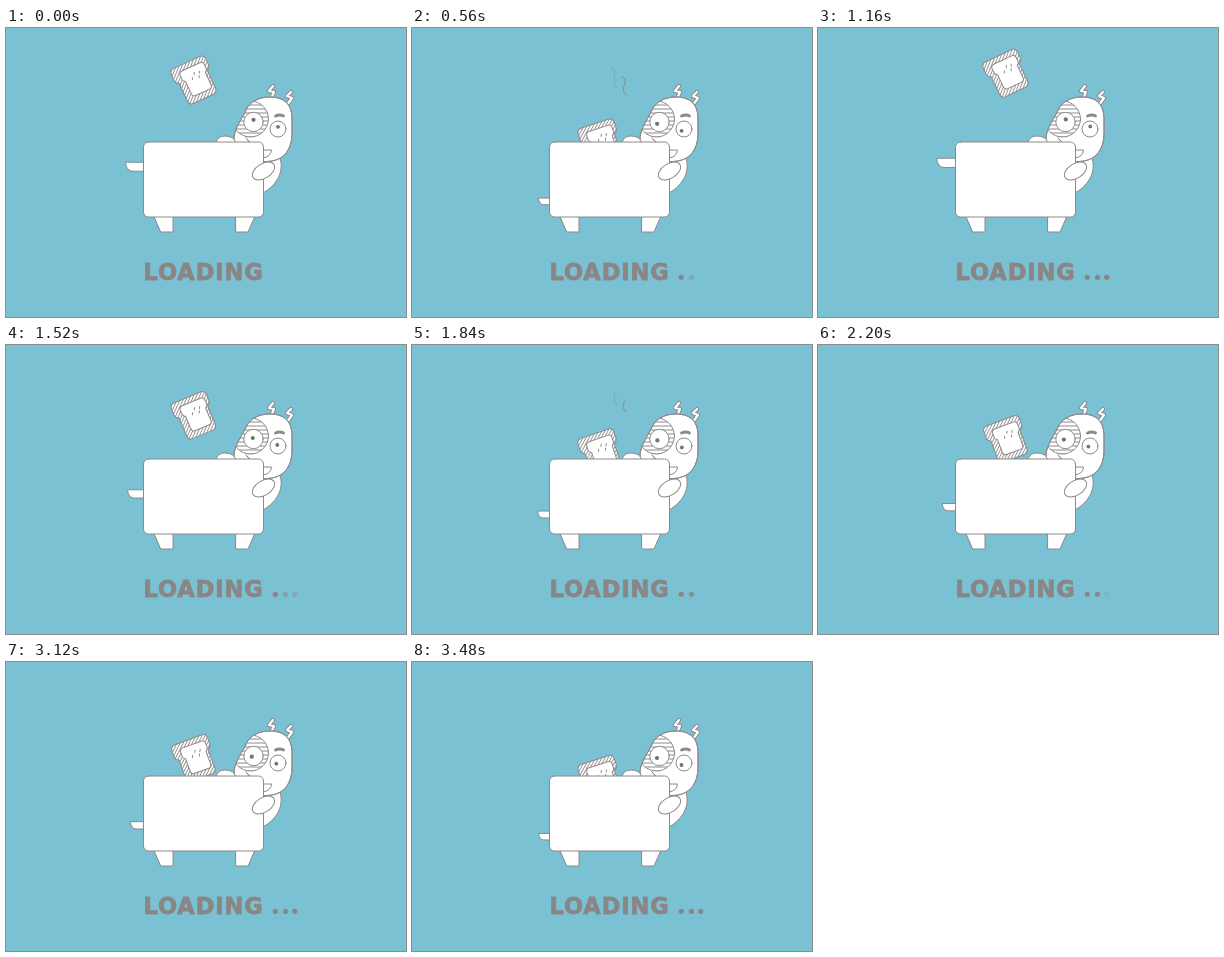
Write an HTML page that moves like this. It is 400 px wide and 289 px high and loops after 4 s.

```html
<!DOCTYPE html>
<html lang="en">
<head>
<meta charset="utf-8">
<title>Loading</title>
<style>
html, body { margin: 0; width: 100%; height: 100%; overflow: hidden; background: #7ac1d4; }
svg { display: block; width: 100vw; height: 100vh; }
.ink { fill: #fff; stroke: #8d898a; stroke-width: 1; stroke-linejoin: round; stroke-linecap: round; }
.line { fill: none; }
.label { font: 700 22.5px "DejaVu Sans", sans-serif; letter-spacing: .9px; fill: #8b8686; stroke: #8b8686; stroke-width: .8; }
</style>
</head>
<body>
<svg viewBox="0 0 400 289">
  <defs>
    <pattern id="crust" width="2.7" height="2.7" patternUnits="userSpaceOnUse" patternTransform="rotate(-43)">
      <rect width="3" height="3" fill="#fff"/>
      <path d="M0 1.3H3" stroke="#8d898a" stroke-width=".9"/>
    </pattern>
    <pattern id="patch" width="4" height="4" patternUnits="userSpaceOnUse">
      <path d="M0 1H4" stroke="#8d898a" stroke-width="1"/>
    </pattern>
    <path id="head" d="M228 112C227 101 237 90 241 80C246 72 255 69 264 69C280 69 286 78 286 91V106C286 120 279 131 266 133C246 136 229 128 228 112Z"/>
    <clipPath id="face"><use href="#head"/></clipPath>
    <path id="slice" d="M-14 -20H14Q19 -20 19 -15V-9Q19 -6 15.5 -4V15Q15.5 20 11 20H-11Q-15.5 20 -15.5 15V-4Q-19 -6 -19 -9V-15Q-19 -20 -14 -20Z"/>
    <path id="zigs" d="M267 58L263 63L268 64L265 71M285 64L281 68L286 70L281 77"/>
  </defs>
  <rect width="400" height="289" fill="#7ac1d4"/>

  <g id="steam" class="ink line">
    <path class="wisp" pathLength="1" opacity=".5" d="M200 40C207 48 198 52 205 60"/>
    <path class="wisp" pathLength="1" d="M211 49C218 55 206 59 214 67"/>
  </g>

  <g class="ink">
    <path d="M256 128H273C277 136 275 146 271 152Q266 160 257 165Z"/>
    <use href="#zigs" class="line" stroke-width="4.2"/>
    <use href="#zigs" class="line" stroke="#fff" stroke-width="2.2"/>
    <use href="#head"/>
    <circle cx="244.5" cy="91" r="18" fill="url(#patch)" clip-path="url(#face)"/>
    <use href="#head" class="line"/>
    <circle cx="247.5" cy="94" r="9.7"/>
    <circle cx="272" cy="101" r="8"/>
    <path class="line" d="M269.5 88Q274 86 277.5 88" stroke-width="2.8"/>
    <path d="M240 110Q250 121 257 122H265.5Q265 129 257 130Z"/>
  </g>
  <g id="eyes" fill="#77706f">
    <circle cx="248" cy="91" r="2.1"/>
    <circle cx="272.5" cy="98" r="1.9"/>
  </g>
  <path class="ink" d="M210 115Q211 108 219 108Q228 108 230 115Z"/>

  <g id="toast" class="ink">
    <use href="#slice" fill="url(#crust)"/>
    <use href="#slice" transform="translate(2 -.3) scale(.7)" stroke-width="1.4"/>
    <path class="line" d="M2 -6L3 -8M7 -5L8 -7M5 -1L6 -3M-2 -2L-1 -4"/>
  </g>

  <path id="lever" class="ink"/>
  <g class="ink">
    <path d="M148 188H167V204H155ZM230 188H249L242 204H230Z"/>
    <rect x="137.5" y="114" width="120" height="75" rx="5"/>
    <ellipse cx="257.5" cy="143" rx="12.3" ry="7.3" transform="rotate(-32 257.5 143)"/>
  </g>

  <text class="label" x="137.5" y="252">LOADING</text>
  <g id="dots" fill="#8b8686">
    <circle cx="269.3" cy="249.3" r="2.6"/>
    <circle cx="279.5" cy="249.3" r="2.6"/>
    <circle cx="288.7" cy="249.3" r="2.6"/>
  </g>
</svg>
<script>
const LOOP = 4000, STEP = 40, LAST = 3480;
const PERIOD = 1400, RISE = 640, PUFF = 340;
const $ = id => document.getElementById(id);
const dots = [...$("dots").children];
const wisps = [...document.querySelectorAll(".wisp")];

const clamp = x => Math.max(0, Math.min(1, x));
const easeOut = u => Math.sin(u * Math.PI / 2);

// 0 at the top of the jump, 1 down in the slot
const drop = phase => phase < RISE
  ? 1 - easeOut(phase / RISE)
  : easeOut((phase - RISE) / (PERIOD - RISE));

function leverPath(k) {
  const mid = 131.6 + 43.1 * k, h = 9.5 - 3 * k, w = 8 - 3 * k;
  const x = 118 + 8.6 * k, top = mid - h / 2, low = mid + h / 2;
  return `M138 ${top}H${x}Q${x + 1} ${low} ${x + w} ${low}H138Z`;
}

// A quick pass that fades away over a slow one
function dotOpacity(i, t) {
  const quick = clamp(t / 380 - i) * clamp((1720 - t) / 500);
  return Math.max(quick, clamp(t / 1000 - i));
}

// Each wisp is traced from its foot, then leaves the same way
function drawSteam(u) {
  const head = 1 - clamp(u / .5), tail = 1 - clamp((u - .7) / .3);
  $("steam").style.display = u > 0 && tail > head ? "" : "none";
  wisps.forEach(w => w.setAttribute("stroke-dasharray", `0 ${head} ${Math.max(0, tail - head)} 2`));
}

function draw(t) {
  const phase = (t - LAST + 3 * PERIOD) % PERIOD, k = drop(phase);
  $("toast").setAttribute("transform", `translate(189 ${40 + 77 * k}) rotate(${8 * k - 26})`);
  $("lever").setAttribute("d", leverPath(k));
  $("eyes").setAttribute("transform", `translate(${-3 * k} ${5 * k})`);
  dots.forEach((dot, i) => dot.setAttribute("opacity", dotOpacity(i, t)));
  drawSteam((phase - PERIOD + PUFF) / PUFF);
}

const start = performance.now();
function tick(now) {
  const t = Math.max(0, now - start) % LOOP;
  draw(Math.min(LAST, Math.floor(t / STEP) * STEP));
  requestAnimationFrame(tick);
}
draw(0);
requestAnimationFrame(tick);
</script>
</body>
</html>
```
